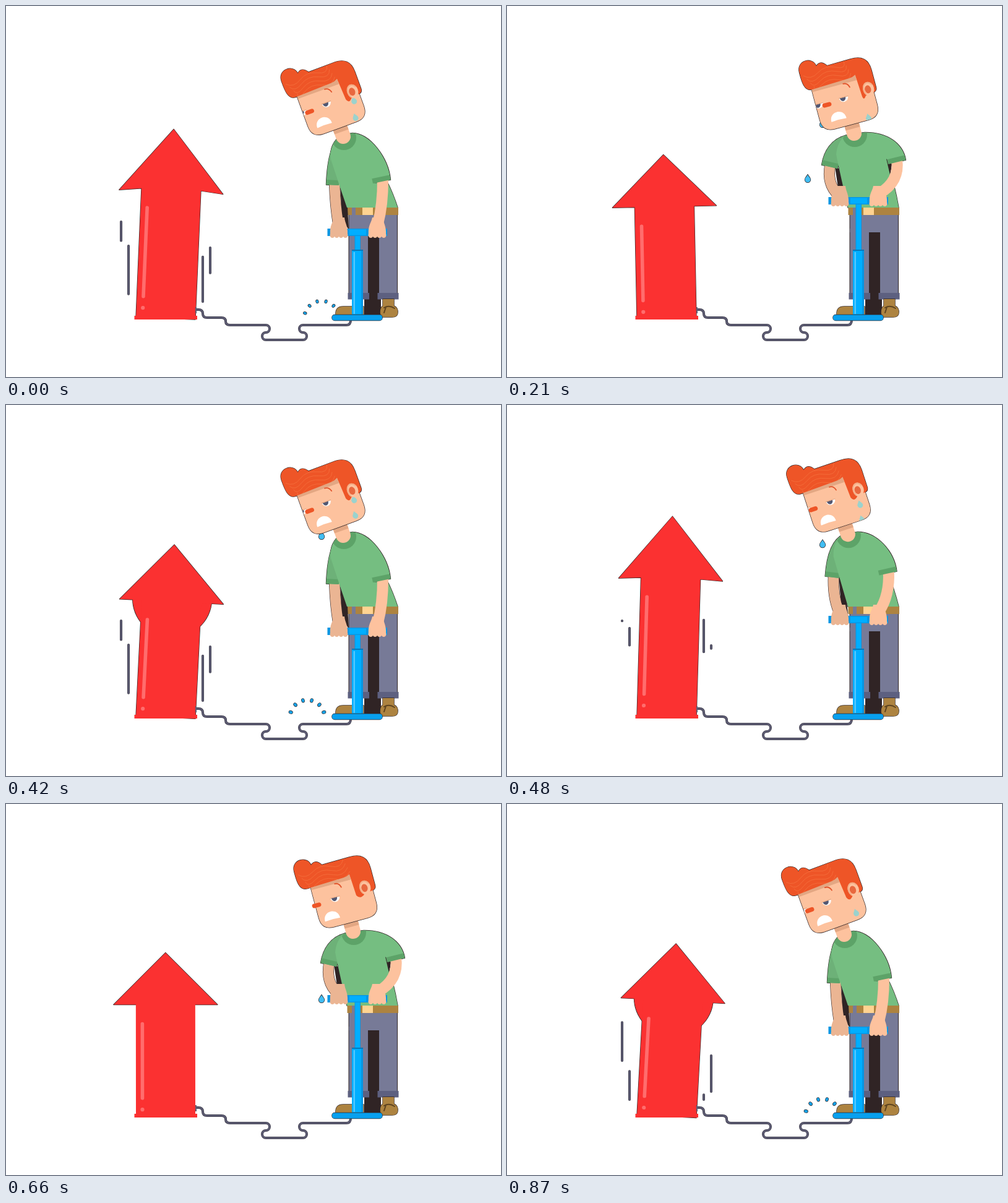
Animation, 800 px wide and 600 px high, one loop 900 ms. Source, as an HTML page with a canvas:

```html
<!DOCTYPE html>
<html lang="en">
<head>
<meta charset="utf-8">
<title>Pumping up the arrow</title>
<style>
html, body { margin: 0; width: 100%; height: 100%; overflow: hidden; background: #fff; }
canvas { display: block; width: 800px; height: 600px; }
</style>
</head>
<body>
<canvas id="stage" width="800" height="600"></canvas>
<script>
const c = document.getElementById('stage').getContext('2d');
const LOOP = 900, HALF = 450, STEP = 30;
const INK = '#302425', SKIN = '#fdc29e', SHADE = '#e3a783', FAR_SKIN = '#ebb593',
  HAIR = '#ee5527', GREEN = '#75be81', GREEN2 = '#6db178', GREEN3 = '#5da368',
  BLUE = '#00aeff', BLUE2 = '#0796e3', JEANS = '#777a97', CUFF = '#5d6080',
  BROWN = '#ad8340', RED = '#fb3131', PINK = '#ff6d6d', GREY = '#5d5c74', SWEAT = '#9ad2cd';

const { PI, sin, cos, sqrt } = Math;
const clamp = x => Math.max(0, Math.min(1, x));
const mix = (a, b, k) => a + (b - a) * k;
const easeOut = (x, n = 2) => 1 - (1 - clamp(x)) ** n;
const turns = x => 2 * PI * x;

// Motion: ph is the time within one pump stroke, t the time within the loop
const lift = ph => easeOut(ph / 210, 3) - easeOut((ph - 225) / 195, 3);
const tilt = ph => -20 + 5 * lift(ph) + 12 * sin(PI * clamp((ph - 210) / 210));
const turn = t => .5 + .5 * sin(turns((t + 15) / LOOP));
const lean = (t, ph) => 3.65 * cos(PI * (ph - 408) / HALF) ** 4 - .6 - .55 * sin(turns(t / LOOP));
const bulge = ph => 465 - 1.275 * (ph - 300);
function stretch(ph) {
  const d = ph < 240 ? ph - 35 : ph - 485;
  const rising = d < 0;
  return cos(PI / 2 * clamp(Math.abs(d) / (rising ? 155 : 175))) ** (rising ? 6 : 2.7);
}

const P = s => new Path2D(s);
function fill(path, color) { c.fillStyle = color; c.fill(path); }
function stroke(path, color, width, cap = 'round') {
  c.strokeStyle = color; c.lineWidth = width; c.lineCap = cap; c.lineJoin = 'round';
  c.stroke(path);
}
const outline = path => stroke(path, INK, 1.4);
function inked(path, color) { outline(path); fill(path, color); }
function rect(x0, y0, x1, y1, color, r = 0) {
  const p = new Path2D();
  p.roundRect(x0, y0, x1 - x0, y1 - y0, r);
  fill(p, color);
}
function oval(x, y, rx, ry, color, end = 2 * PI) {
  const p = new Path2D();
  p.ellipse(x, y, rx, ry, 0, 0, end);
  fill(p, color);
}
function tube(path) {
  stroke(path, '#3b3946', 4);
  stroke(path, GREY, 2.6);
}
function clipped(path, draw) {
  c.save(); c.clip(path); draw(); c.restore();
}
function placed(x, y, degrees, draw) {
  c.save(); c.translate(x, y); c.rotate(degrees * PI / 180); draw(); c.restore();
}

const HOSE = P(`M307 491H311Q318 491 318 497.5Q318 504 325 504H348Q355 504 355 510Q355 516 362 516
  H420A6 6 0 0 1 420 528A6 6 0 0 0 420 540H480A6 6 0 0 0 480 528A6 6 0 0 1 480 516H550Q557 516 557 508`);

function arrow(t, ph) {
  const s = stretch(ph), angle = lean(t, ph);
  const tip = -264.5 - 61 * s, neck = tip + 84 + 16.5 * sqrt(s);
  const wing = neck + (ph < 135 ? 4 * cos(PI * ph / 90) : 0);
  const top = P(`M-48 ${neck}L-84 ${wing}L0 ${tip}L84 ${wing}L48 ${neck}`);
  const body = P(`M0 ${tip}L84 ${wing}L48 ${neck}V0H-48V${neck}L-84 ${wing}Z`);
  const ball = new Path2D(), below = new Path2D();
  if (ph >= 300 && ph <= 420) ball.arc(1, bulge(ph) - 505, 64, 0, 7);
  below.rect(-100, wing - 1, 200, 400);
  placed(258, 505, angle, () => {
    outline(Math.abs(angle) > .3 ? body : top);
    clipped(below, () => inked(ball, RED));
    fill(body, RED);
    const low = -55 + neck * .16;
    stroke(P(`M-37.5 ${neck + 31}V${low + 54.5}`), PINK, 5.6);
    oval(-37.5, low + 73, 3.1, 3.1, PINK);
  });
  rect(207.5, 501, 309, 507, RED);
  rect(306, 487, 308, 497, GREY);
}

// Each line grows upwards from the ground, then its tail catches up
function speedLine(x, top, s) {
  if (s <= 0 || s >= 175) return;
  const y = d => mix(478, top, easeOut(d));
  tube(P(`M${x} ${y(s / 100)}V${y((s - 45) / 130) + .1}`));
}
function speedLines(s) {
  speedLine(186, 349, s + 112);
  speedLine(198, 361, s + 52);
  speedLine(318, 347, s + 33);
  speedLine(330, 389, s + 85);
}

function drop(x, y, color, k = .9) {
  const r = 5 * k;
  const p = P(`M${x} ${y - 7 * k}C${x + 2 * k} ${y - 3 * k} ${x + r} ${y - k} ${x + r} ${y + 2 * k}
    A${r} ${r} 0 0 1 ${x - r} ${y + 2 * k}C${x - r} ${y - k} ${x - 2 * k} ${y - 3 * k} ${x} ${y - 7 * k}Z`);
  if (color !== SWEAT) outline(p);
  fill(p, color);
}
function splash(x, age) {
  if (age >= 90) return;
  const r = age < 30 ? 18 : 28, k = 1.1 - age / 250;
  for (let i = 0; i < 6; i++) {
    placed(x, 505, -17 - i * 29.2, () => {
      const p = new Path2D();
      p.ellipse(r, 0, 3 * k, 2.2 * k, 0, 0, 7);
      inked(p, '#16a2e8');
    });
  }
}
function drops(t) {
  const blue = '#41bdf2', d = t - 420;
  if (t >= 60 && t < 390) drop(486, 211 + .00298 * (t - 59) ** 2, blue);
  if (t >= 210 && t < 840) drop(510, d < 0 ? 190 + 21 * ((t - 210) / 210) ** 2.5 : 211 + .15 * d + .00118 * d * d, blue);
  splash(487, (t - 390 + LOOP) % LOOP);
  splash(510, (t - 840 + LOOP) % LOOP);
}

function legs() {
  rect(579, 366, 606, 500, INK);
  rect(553.5, 338, 633, 464, INK);
  rect(554.5, 338, 632, 366, JEANS);
  rect(554.5, 360, 585, 466, JEANS);
  rect(603, 360, 632, 466, JEANS);
  rect(552.5, 464, 587, 474.5, CUFF);
  rect(600.5, 464, 634.5, 474.5, CUFF);
  inked(P('M533 499Q532 486 545 486H578V499Z'), BROWN);
  inked(P('M609 474H627V485Q634 488 633 497Q632 504 622 503H608Q604 500 605 492Q606 487 609 485Z'), BROWN);
  stroke(P('M611 488Q619 483 628 489M614 487L611 496'), '#5f4420', 2);
  rect(551.5, 326, 634, 338, BROWN);
  rect(559, 326, 565, 338, JEANS);
  rect(576, 326, 593, 338, '#ffd391');
}

function pump(y) {
  rect(563.5, y, 573, 396, BLUE2);
  rect(564.5, y, 572, 396, BLUE);
  rect(519.5, y - 6, 616, y + 6, BLUE2);
  rect(555, y - 4.5, 582, y + 4.5, BLUE);
  rect(559, 395, 577, 500, BLUE);
  rect(559, 394, 577, 396, '#0878b8');
  rect(574, 396, 577, 500, BLUE2);
  rect(561.5, 398, 564, 498, '#52c8ff');
  const foot = new Path2D();
  foot.roundRect(527, 499.5, 81, 9, 4);
  inked(foot, '#08a0ee');
}

function hand(x, y, color) {
  fill(P(`M${x - 8} ${y - 24}C${x - 10} ${y - 14} ${x - 15} ${y - 12} ${x - 14} ${y + 4}
    H${x + 14}C${x + 15} ${y - 10} ${x + 10} ${y - 14} ${x + 9} ${y - 24}Z`), color);
  for (let i = -1.5; i < 2; i++) oval(x + i * 7, y + 4.5, 4, 4.5, color);
}

function eye(x) {
  oval(x, -61, 7.5, 7.5, '#fff', PI);
  oval(x - 1.5, -61, 4.8, 6, '#525772', PI);
  rect(x - 8, -61.6, x + 8, -60.4, SHADE);
}

// Drawn around the foot of the neck; q turns the face sideways
function head(k, angle, q, t) {
  const s = 7 * q, b = 8 * q, e = -14 + 12.5 * q, m = -27 + 9 * q, ear = 37 + 4 * q, nose = -50 + 15.5 * q;
  const face = P('M-48 -95H48V-35Q48 -15 28 -15H-28Q-48 -15 -48 -35Z');
  const hair = P(`M${s - 54} -86C${s - 68} -86 ${s - 67} -106 ${s - 67} -118C${s - 67} -138 ${s - 40} -138 ${s - 38} -121
    Q${s - 29} -129 ${s - 21} -117L25 -117.5C45 -118 53.5 -109 53.5 -92V-63Q53.5 -57 48 -56
    L34 -54Q${25 + b / 2} -46 ${20 + b} -55L${18 + b} -91Q${13 + b} -88 ${7 + b} -88Z`);
  placed(545 + 16 * k, 211 - 5 * k, angle, () => {
    rect(-12, -30, 12, 12, SKIN, 12);
    rect(-12, -16, 12, -8, SHADE);
    outline(hair);
    inked(face, SKIN);
    clipped(face, () => {
      rect(-48, -92, 18 + b, -82, SHADE);
      eye(e - 42);
      for (const start of [0, 250, 420, 715]) {
        const age = (t - start + LOOP) % LOOP;
        if (age < 238) drop(mix(36, 29, clamp(age / 180)), -49 + .142 * age, SWEAT);
      }
    });
    fill(hair, HAIR);
    clipped(hair, () => {
      for (let i = 0; i < 4; i++) {
        const y = -113 + i * 7;
        stroke(P(`M${s - 62 + i * 4} ${y + 2}Q${s - 52} ${y + 12} ${s - 38} ${y + 3}T${s - 8} ${y + 2}T${14 + i * 2} ${y - 3}`), '#f46e3c', .8);
      }
    });
    oval(ear, -63.5, 9, 11.5, SKIN);
    stroke(P(`M${ear - 6} -56C${ear - 13} -72 ${ear + 1} -80 ${ear + 7} -69`), '#f3ad86', 2);
    oval(ear - 1, -63, 5, 6.5, '#e8683f');
    eye(e);
    stroke(P(`M${e + 5} -82Q${e + 12} -82 ${e + 14} -74`), '#e2552d', 1.8);
    stroke(P(`M${nose} -56H${nose + 8}`), HAIR, 7);
    fill(P(`M${m - 12.5} -27C${m - 13} -45 ${m + 13} -45 ${m + 12.5} -27Q${m} -28.5 ${m - 12.5} -27Z`), '#fff');
  });
}

// Strip of cloth above the sleeve end that runs from a to b
function hem(a, b) {
  const dx = b[0] - a[0], dy = b[1] - a[1], w = 8 / Math.hypot(dx, dy) * Math.sign(dx);
  const up = ([x, y]) => [x + dy * w, y - dx * w];
  fill(P(`M${a}L${b}L${up(b)}L${up(a)}Z`), GREEN3);
}

function man(t, ph) {
  const k = lift(ph), y = 366 - 51 * k;
  // A joint at rest, and how far it moves when the handle is up
  const at = (x, y, dx, dy) => [x + dx * k, y + dy * k];
  const out = at(621.5, 281, 23, -32), inner = at(593, 287, 23, -31), pit = at(616, 284, -3, -37);
  const farOut = at(517.5, 289, -9, -32), farIn = at(538, 290, -4, -27);
  const neck = at(560, 205.5, 18, -1), nape = at(542, 209, 6, 0);

  const torso = P(`M${neck}C${at(588, 206, 26, -2)} ${at(618, 245, 22, -23)} ${out}L${inner}L${pit}
    Q${at(626, 304, 1, -14)} 633 326H551Q${at(538, 288, 0, -18)} ${at(525, 248, 7, -8)}Q${at(522, 222, 12, -4)} ${nape}Z`);
  const sleeve = P(`M${nape}C${at(525, 219, -1, -4)} ${at(519, 250, -7, -15)} ${farOut}L${farIn}L${at(545, 220, 3, 0)}Z`);
  const farArm = P(`M${at(531, 287, -8.5, -31)}Q${at(532, 322, -16, -34)} ${at(537, 352, -1, -46)}`);
  const arm = P(`M${at(609, 281, 21, -33)}Q${at(609, 322, 26, -38)} ${at(601, 352, 1, -49)}`);

  outline(torso);
  outline(sleeve);
  legs();
  fill(P(`M${at(540, 288, -10, -28)}L${at(552, 326, -13, -62)}L${at(554, 362, -6, -50)}L${at(543, 345, -7, -45)}Z`), INK);
  stroke(farArm, INK, 18, 'butt');
  stroke(farArm, FAR_SKIN, 16.8, 'butt');
  fill(sleeve, GREEN2);
  hem(farOut, farIn);
  fill(torso, GREEN);
  clipped(torso, () => oval(546 + 16 * k, 213 - 5 * k, 20, 20, GREEN3));
  if (k > .5) fill(P('M613 247L622 256Q621 266 619 273Z'), INK);
  pump(y);
  stroke(arm, SKIN, 18, 'butt');
  hem(inner, out);
  hand(538, y, FAR_SKIN);
  hand(600, y, SKIN);
  head(k, tilt(ph), turn(t), t);
}

function draw(t) {
  const ph = t % HALF;
  c.fillStyle = '#fff';
  c.fillRect(0, 0, 800, 600);
  for (const peak of [0, 420, LOOP]) speedLines(t - peak);
  tube(HOSE);
  arrow(t, ph);
  drops(t);
  man(t, ph);
}

const begin = performance.now();
function tick() {
  const t = (performance.now() - begin) % LOOP;
  draw(Math.floor(t / STEP) * STEP);
  requestAnimationFrame(tick);
}
tick();
</script>
</body>
</html>
```
